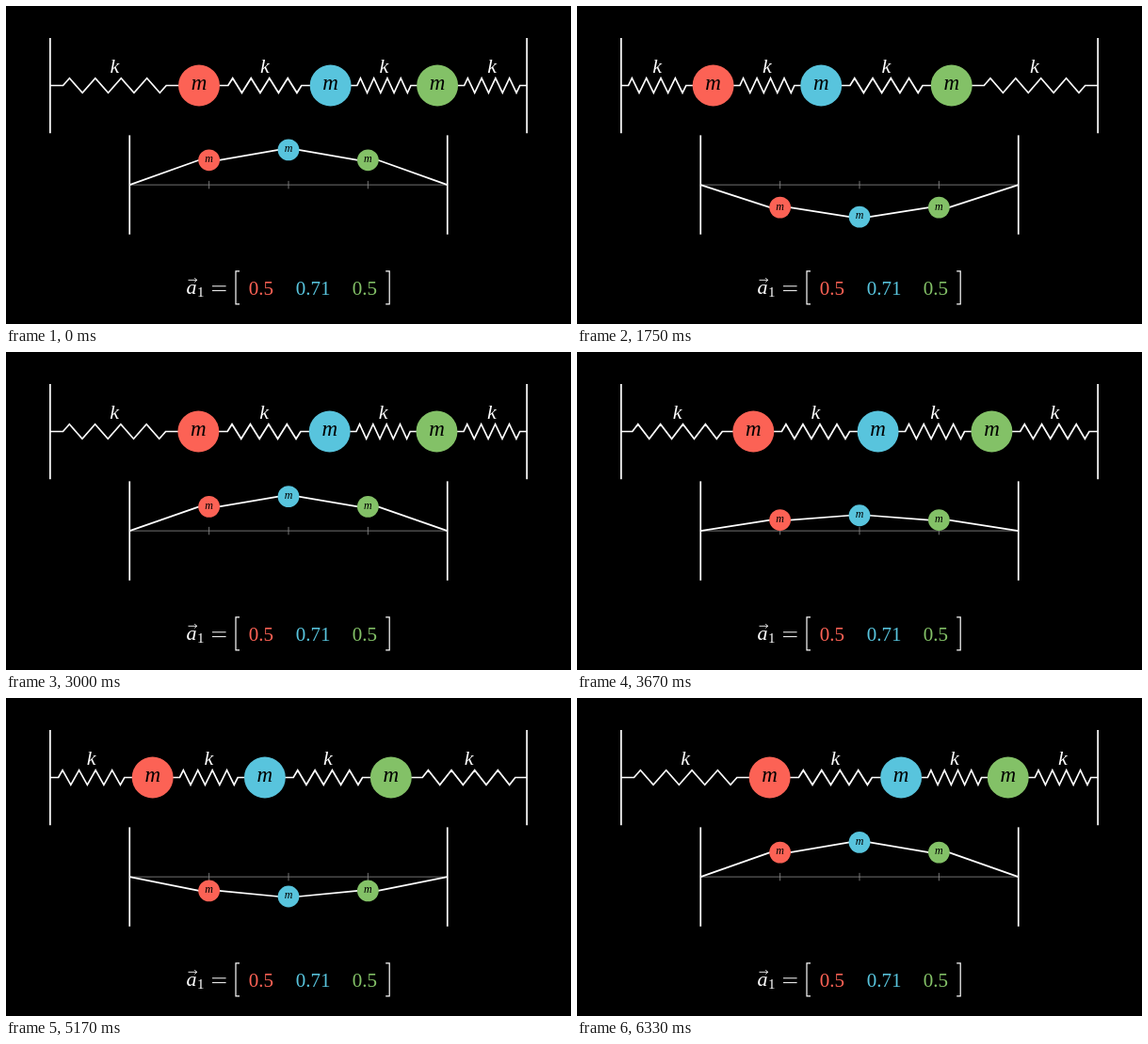
Write an HTML page with a canvas that moves like this. It is 600x338 px and loops after 6410 ms.

```html
<!DOCTYPE html>
<html lang="en">
<head>
<meta charset="utf-8">
<title>Three coupled masses</title>
<style>
  html, body { margin: 0; width: 100%; height: 100%; overflow: hidden; background: #000; }
  canvas { display: block; width: 100vw; height: 100vh; }
</style>
</head>
<body>
<canvas id="stage"></canvas>
<script>
const W = 600, H = 338, LOOP = 6410, STEP = 250 / 3;
const UNIT = W / (128 / 9);
const WHITE = '#fff', BLACK = '#000';
const COLORS = ['#fc6255', '#58c4dd', '#83c167'];
const SHAPE = [0.5, Math.SQRT1_2, 0.5];
const OMEGA = 2, PHASE = 1 / 15;

const top3 = { y: 84.5, gap: 3 * UNIT, wall: 1.2 * UNIT, r: UNIT / 2, amp: 1.5 * UNIT };
const low3 = { y: 190.1, gap: 2 * UNIT, wall: 1.25 * UNIT, r: UNIT / 4, amp: 1.25 * UNIT };

const canvas = document.getElementById('stage');
const ctx = canvas.getContext('2d');

function fit() {
  const ratio = window.devicePixelRatio || 1;
  canvas.width = Math.round(innerWidth * ratio);
  canvas.height = Math.round(innerHeight * ratio);
  ctx.setTransform(canvas.width / W, 0, 0, canvas.height / H, 0, 0);
}

function path(points, width = 1.7, color = WHITE) {
  ctx.beginPath();
  points.forEach(([x, y]) => ctx.lineTo(x, y));
  ctx.lineWidth = width;
  ctx.strokeStyle = color;
  ctx.stroke();
}

function text(str, x, y, size, color = WHITE, style = 'italic') {
  ctx.font = `${style} ${size}px "Liberation Serif", "Times New Roman", serif`;
  ctx.textAlign = 'center';
  ctx.textBaseline = 'alphabetic';
  ctx.fillStyle = color;
  ctx.fillText(str, x, y);
}

function mass(x, y, r, color, size) {
  ctx.beginPath();
  ctx.arc(x, y, r + 0.85, 0, Math.PI * 2);
  ctx.fillStyle = color;
  ctx.fill();
  text('m', x, y + size * 0.2, size, BLACK);
}

function walls({ y, gap, wall }) {
  for (const side of [-2, 2]) {
    const x = W / 2 + side * gap;
    path([[x, y - wall], [x, y + wall]]);
  }
}

function spring(x1, x2, y) {
  const len = x2 - x1, teeth = 8, height = 7.8;
  const pts = [[x1, y], [x1 + 0.1 * len, y]];
  for (let i = 0; i < teeth; i++) {
    const u = 0.1 + 0.8 * (i + 0.5) / teeth;
    pts.push([x1 + u * len, y + (i % 2 ? height : -height)]);
  }
  pts.push([x2 - 0.1 * len, y], [x2, y]);
  path(pts);
  text('k', (x1 + x2) / 2, 70.6, 22);
}

// Calls link(left, right) for each gap between wall, masses and wall.
function eachLink(pts, r, link) {
  for (let i = 0; i < 4; i++) {
    const [ax, ay] = pts[i], [bx, by] = pts[i + 1];
    link([ax + (i > 0 ? r : 0), ay], [bx - (i < 3 ? r : 0), by]);
  }
}

function drawSprings(swing) {
  const { y, gap, r, amp } = top3;
  const pts = [0, ...SHAPE, 0].map((a, i) => [W / 2 + (i - 2) * gap + a * amp * swing, y]);
  walls(top3);
  eachLink(pts, r, (a, b) => spring(a[0], b[0], y));
  COLORS.forEach((c, i) => mass(pts[i + 1][0], y, r, c, 23));
}

function drawString(swing) {
  const { y, gap, r, amp } = low3;
  const pts = [0, ...SHAPE, 0].map((a, i) => [W / 2 + (i - 2) * gap, y - a * amp * swing]);
  path([pts[0], pts[4]].map(([x]) => [x, y]), 0.85, '#888');
  for (const [x] of pts.slice(1, 4)) path([[x, y - 4.2], [x, y + 4.2]], 0.85, '#888');
  walls(low3);
  eachLink(pts, r, (a, b) => path([a, b]));
  COLORS.forEach((c, i) => mass(...pts[i + 1], r, c, 12));
}

function drawVector() {
  text('a', 197, 305.6, 22);
  path([[193.5, 291.3], [202.5, 291.3]], 0.9);
  path([[200.2, 289.2], [202.8, 291.3], [200.2, 293.4]], 0.9);
  text('1', 206.8, 308.6, 15, WHITE, 'normal');
  for (const y of [297.8, 302.6]) path([[219, y], [233.6, y]], 1);
  for (const [x, dx] of [[244, 4], [407.2, -4]]) {
    path([[x + dx, 281.8], [x, 281.8], [x, 316.8], [x + dx, 316.8]], 1.2);
  }
  [270.8, 326, 380.8].forEach((x, i) => {
    text(String(+SHAPE[i].toFixed(2)), x, 306.5, 21, COLORS[i], 'normal');
  });
}

// Index of the held step, with step starts rounded to 10 ms.
function stepAt(ms) {
  const n = Math.floor(ms / STEP) + 1;
  return Math.round(n * STEP / 10) * 10 > ms ? n - 1 : n;
}

function draw(now) {
  const n = Math.min(stepAt(now % LOOP), 76);
  const swing = Math.cos(OMEGA * n * STEP / 1000 + PHASE);
  ctx.fillStyle = BLACK;
  ctx.fillRect(0, 0, W, H);
  drawSprings(swing);
  drawString(swing);
  drawVector();
}

let start = null;
function tick(now) {
  if (start === null) start = now;
  draw(now - start);
  requestAnimationFrame(tick);
}

addEventListener('resize', fit);
fit();
draw(0);
requestAnimationFrame(tick);
</script>
</body>
</html>
```
